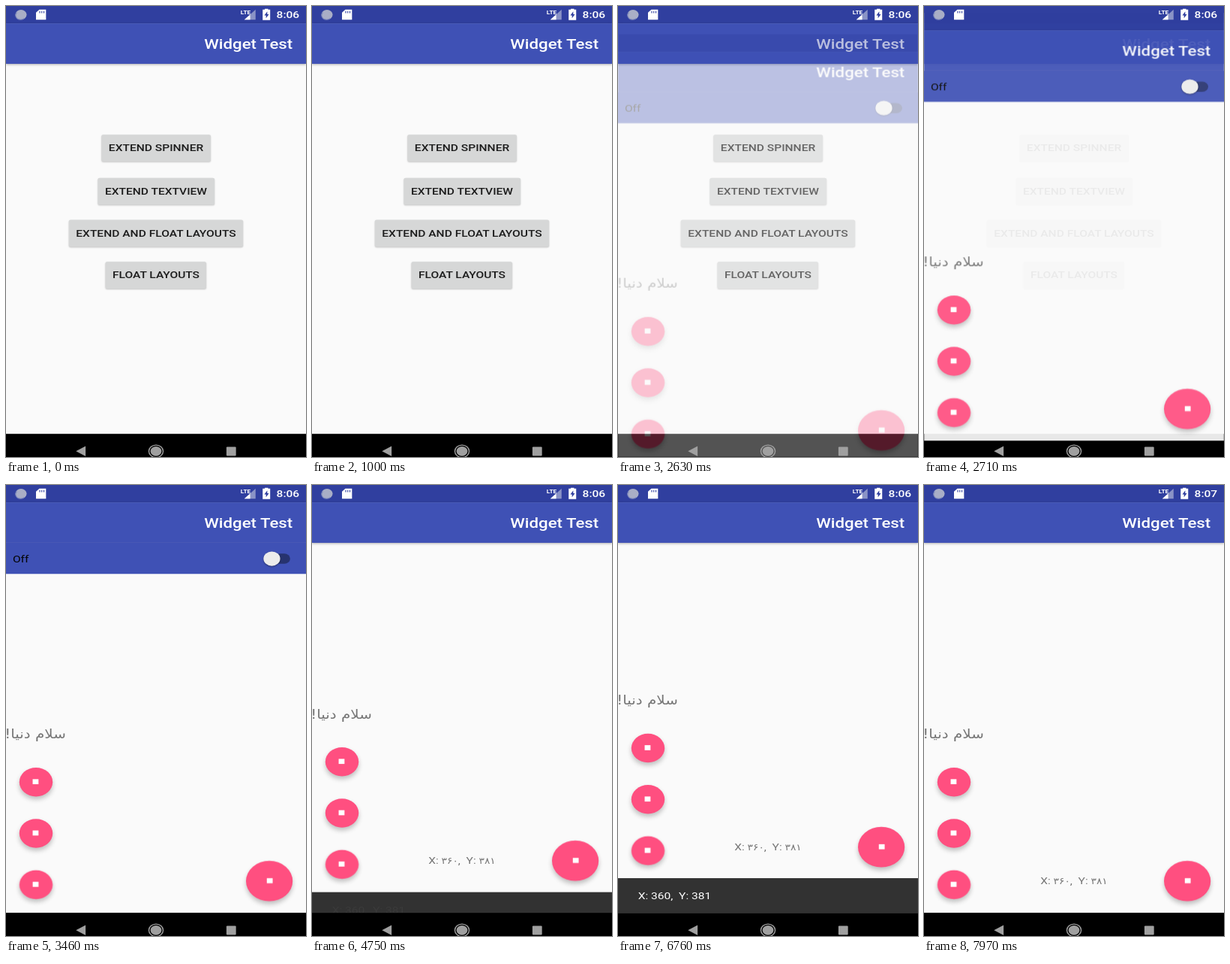
Write an HTML page that moves like this. It is 400 px wide and 600 px high and loops after 8000 ms.

```html
<!DOCTYPE html>
<html lang="en">
<head>
<meta charset="utf-8">
<title>Widget Test</title>
<style>
  html, body { margin: 0; width: 100%; height: 100%; overflow: hidden; background: #000; }
  #stage { position: fixed; inset: 0; overflow: hidden; overflow: clip; contain: strict; }
  /* Laid out in dp; the recording squeezes the screen vertically. */
  #phone {
    position: absolute; left: 0; top: 0; width: 360px; height: 624px; overflow: hidden;
    transform-origin: 0 0; transform: scale(1.11111, .9615);
    font: 14px/20px Roboto, sans-serif;
  }
  #phone div, #phone svg { position: absolute; box-sizing: border-box; white-space: pre; }
  .screen { left: 0; top: 0; width: 360px; height: 624px; background: #fafafa; }
  .status { left: 0; top: 0; width: 360px; height: 24px; background: #303f9f; }
  .toolbar {
    left: 0; top: 24px; width: 360px; height: 56px; background: #3f51b5; color: #fff;
    font: 500 20px/57px Roboto, sans-serif; text-align: right; padding-right: 16px;
    box-shadow: 0 1px 3px rgba(0, 0, 0, .3);
  }
  .nav { left: 0; top: 592px; width: 360px; height: 48px; background: #000; }
  #phone .button {
    left: 50%; height: 37px; margin-top: -18.5px; padding: 0 8.5px; transform: translateX(-50%);
    border-radius: 2px; background: #d6d7d7; color: #1c1c1c; overflow: hidden;
    font-weight: 500; line-height: 37px; box-shadow: 0 1px 2px rgba(0, 0, 0, .22);
  }
  .button span { position: relative; }
  #ripple {
    left: 15px; top: -89px; width: 214px; height: 214px; border-radius: 50%;
    background: rgba(0, 0, 0, .1);
  }
  #bar { left: 0; top: 80px; width: 360px; height: 43px; background: #3f51b5; color: #050505; }
  #bar .label { left: 8px; top: 12px; }
  #bar .track { left: 313px; top: 15px; width: 28px; height: 14px; border-radius: 7px; background: #27336f; }
  #bar .thumb {
    left: 308.5px; top: 12px; width: 20px; height: 20px; border-radius: 50%;
    background: #ececec; box-shadow: 0 1px 2px rgba(0, 0, 0, .4);
  }
  #content { left: 0; top: 0; width: 360px; height: 624px; color: #757575; }
  .hello { right: 288.2px; top: 334.5px; font: 17.9px/20px "DejaVu Sans", sans-serif; direction: rtl; }
  #coords { left: 0; width: 360px; top: 536.5px; text-align: center; }
  #coords span { font: 12.4px/20px "DejaVu Sans", sans-serif; }
  .fab { border-radius: 50%; background: #ff4f80; box-shadow: 0 4px 6px rgba(0, 0, 0, .24); }
  .fab i {
    position: absolute; left: 50%; top: 50%; width: 7px; height: 7px;
    margin: -3.5px; background: #fff;
  }
  #snack {
    left: 0; top: 544px; width: 360px; height: 48px; background: #323232;
    color: #fff; padding-left: 24px; line-height: 49px;
  }
  #note { display: inline-block; }
  #phone .clock { left: 324.5px; top: 2px; color: #fff; font-weight: 500; }
</style>
</head>
<body>
<div id="stage"><div id="phone">
  <div class="screen" id="menu">
    <div class="status"></div>
    <div class="toolbar">Widget Test</div>
    <div class="nav"></div>
  </div>

  <div class="screen" id="detail">
    <div class="status"></div>
    <div class="toolbar">Widget Test</div>
    <div id="bar">
      <div class="label">Off</div><div class="track"></div><div class="thumb"></div>
    </div>
    <div id="content">
      <div class="hello">سلام دنیا!</div>
      <div id="coords" dir="ltr">X: <span>۳۶۰</span>,  Y: <span>۳۸۱</span></div>
    </div>
    <div id="snack"><span id="note">X: 360,  Y: 381</span></div>
    <div class="nav"></div>
  </div>

  <svg width="360" height="624" viewBox="0 0 360 624">
    <circle cx="18" cy="12" r="6.8" fill="#a9aec6"/>
    <path d="M13 9a6 6 0 0 0 9 8" fill="none" stroke="#7682bb"/>
    <path d="M40 5h8v14H36V9z" fill="#fff"/>
    <path d="M40.5 7v3M43 7v3M45.5 7v3" stroke="#303f9f"/>
    <path d="M286 19L299.5 5V19z" fill="#8a93c6"/>
    <path d="M286 19L293 11.7V19z" fill="#fff"/>
    <text x="281.5" y="11" font-family="Roboto, sans-serif" font-weight="700" font-size="7.5" fill="#fff">LTE</text>
    <path d="M310.5 5V4h4v1h2.5v14.5h-9V5z" fill="#fff"/>
    <path d="M313.5 7.5l-3.5 5.5h2v4l3.5-5.5h-2z" fill="#303f9f"/>
    <g fill="#a0a0a0">
      <path d="M84 616L95.5 609V623z"/>
      <circle cx="180" cy="616" r="6.6"/>
      <circle cx="180" cy="616" r="8.6" fill="none" stroke="#a0a0a0" stroke-width="1.3"/>
      <rect x="264.5" y="610" width="11.5" height="12.5" rx="1"/>
    </g>
  </svg>
  <div class="clock" id="before">8:06</div>
  <div class="clock" id="after">8:07</div>
</div></div>

<script>
const LOOP = 8000;
const $ = id => document.getElementById(id);

function add(parent, cls, css, html) {
  const el = document.createElement('div');
  el.className = cls;
  Object.assign(el.style, css);
  el.innerHTML = html;
  parent.append(el);
  return el;
}

const buttons = [
  ['EXTEND SPINNER', 196.7],
  ['EXTEND TEXTVIEW', 256.1],
  ['EXTEND AND FLOAT LAYOUTS', 314.8],
  ['FLOAT LAYOUTS', 372.9]
].map(([label, y]) => add($('menu'), 'button', { top: y + 'px' }, `<span>${label}</span>`));

const pressed = buttons[2];
const ripple = document.createElement('div');
ripple.id = 'ripple';
pressed.prepend(ripple);

// centre x, centre y, diameter
[[35.6, 410.8, 40], [35.6, 481.8, 40], [35.6, 552.8, 40], [316, 547.6, 56]].forEach(([x, y, d]) =>
  add($('content'), 'fab', {
    left: x - d / 2 + 'px', top: y - d / 2 + 'px', width: d + 'px', height: d + 'px'
  }, '<i></i>'));

const HOLD = 'step-end', STANDARD = 'cubic-bezier(.4,0,.2,1)';
const QUINT = 'cubic-bezier(.22,1,.36,1)', QUART = 'cubic-bezier(.25,1,.5,1)';

// Each step: [time, value, easing towards the next step]; values hold by default.
function play(el, prop, steps) {
  const rows = [...steps, [LOOP, steps[steps.length - 1][1]]];
  const frames = rows.map(([t, value, easing = HOLD]) => ({ offset: t / LOOP, [prop]: value, easing }));
  return el.animate(frames, { duration: LOOP, iterations: Infinity });
}

const up = y => `translateY(${y}px)`;
const rest = '0 1px 2px 0 rgba(0,0,0,.22)';
const lifted = '0 2px 7px 1px rgba(0,0,0,.32)';

const tracks = [
  play(pressed, 'boxShadow', [[0, rest], [1880, rest, 'ease-out'], [1980, lifted], [2300, lifted, 'ease-in'], [2420, rest]]),
  play(ripple, 'transform', [[0, 'scale(0)'], [1940, 'scale(0)', 'linear'], [2090, 'scale(.31)', 'linear'], [2380, 'scale(1.15)']]),
  play(ripple, 'opacity', [[0, 0], [1940, 1], [2230, 1, 'linear'], [2520, 0]]),

  play($('detail'), 'transform', [[0, up(51)], [2612, up(51), QUINT], [2962, up(0)]]),
  play($('detail'), 'opacity', [[0, 0], [2612, 0, QUART], [2812, 1]]),

  play($('bar'), 'opacity', [[0, 1], [4630, 0]]),
  play($('coords'), 'opacity', [[0, 0], [4630, 1]]),
  play($('content'), 'transform', [[0, up(0)], [4653, up(0), STANDARD], [4903, up(-47)], [7720, up(-47), STANDARD], [7970, up(0)]]),
  play($('snack'), 'transform', [[0, up(48)], [4653, up(48), STANDARD], [4903, up(0)], [7720, up(0), STANDARD], [7970, up(48)]]),
  play($('note'), 'opacity', [[0, 0], [4725, 0, 'ease-in-out'], [4905, 1], [7720, 1, 'ease-in-out'], [7900, 0]]),

  play($('before'), 'opacity', [[0, 1], [6800, 0]]),
  play($('after'), 'opacity', [[0, 0], [6800, 1]])
];
const start = document.timeline.currentTime || 0;
tracks.forEach(track => { track.startTime = start; });
</script>
</body>
</html>
```
